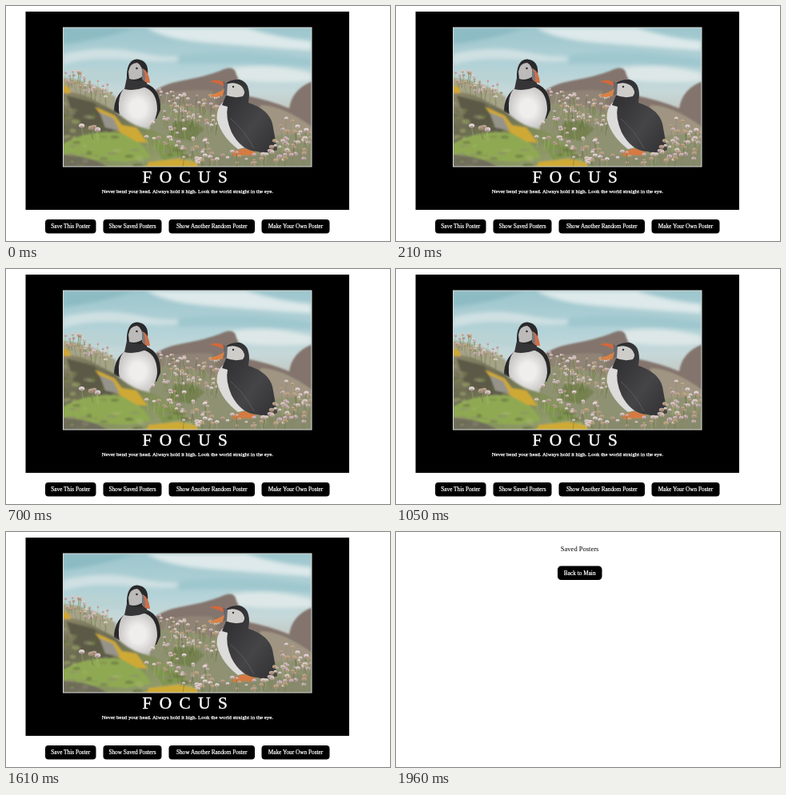
Recreate the animation shown at these times as an HTML page. Size 480 by 294 pixels, loop 3080 ms.

```html
<!DOCTYPE html>
<html lang="en">
<head>
<meta charset="utf-8">
<title>Poster maker</title>
<style>
html, body { margin: 0; width: 100%; height: 100%; overflow: hidden; background: #fff; }
svg { display: block; width: 100vw; height: 100vh; }
text { font-family: "Liberation Serif", "Times New Roman", serif; text-anchor: middle; }
.label { font-size: 7.3px; fill: #fff; stroke: #fff; stroke-width: .22px; }
.caption { font-size: 6.81px; fill: #fff; stroke: #fff; stroke-width: .25px; }
.headline { font-size: 21.3px; letter-spacing: 9.4px; fill: #fff; stroke: #fff; stroke-width: .4px; text-anchor: start; }
.heading { font-size: 8.5px; }
.main { animation: main 3080ms step-end infinite; }
.saved { visibility: hidden; animation: saved 3080ms step-end infinite; }
.pressed { animation: press 3080ms step-end infinite; }
@keyframes main { 0% { visibility: visible } 63.63%, 100% { visibility: hidden } }
@keyframes saved { 0% { visibility: hidden } 63.63%, 100% { visibility: visible } }
@keyframes press {
  0% { fill: #000; stroke: none }
  59.09% { fill: #615b9c; stroke: none }
  61.36% { fill: #615b9c; stroke: #aaa59c }
  63.63%, 100% { fill: #000; stroke: none }
}
</style>
</head>
<body>
<svg viewBox="0 0 480 294" preserveAspectRatio="none">
  <defs>
    <linearGradient id="sea" x2="0" y2="1">
      <stop offset="0" stop-color="#9dc6cd"/>
      <stop offset=".3" stop-color="#b4d3d8"/>
      <stop offset=".45" stop-color="#c6d8d9"/>
      <stop offset=".6" stop-color="#c3c8c2"/>
    </linearGradient>
    <linearGradient id="slope" x2=".8" y2="1">
      <stop offset="0" stop-color="#8b8669"/>
      <stop offset=".35" stop-color="#6b6a52"/>
      <stop offset=".65" stop-color="#83905a"/>
      <stop offset="1" stop-color="#98a075"/>
    </linearGradient>
    <linearGradient id="wing" x2="1" y2="1">
      <stop offset="0" stop-color="#29292c"/>
      <stop offset=".6" stop-color="#454548"/>
      <stop offset="1" stop-color="#303033"/>
    </linearGradient>
    <radialGradient id="belly">
      <stop offset=".4" stop-color="#efeeed"/>
      <stop offset="1" stop-color="#cbc9c8"/>
    </radialGradient>
    <filter id="soft" x="-30%" y="-30%" width="160%" height="160%"><feGaussianBlur stdDeviation="2.5"/></filter>
    <filter id="mild" x="-20%" y="-20%" width="140%" height="140%"><feGaussianBlur stdDeviation="1.1"/></filter>
    <clipPath id="frame"><rect x="71.5" y="27" width="310.5" height="174"/></clipPath>
  </defs>

  <g class="main">
    <rect x="24.5" y="7" width="404.5" height="248"/>
    <g clip-path="url(#frame)">
      <rect x="71" y="27" width="312" height="175" fill="url(#sea)"/>
      <g filter="url(#soft)">
        <path d="M71 27H160Q130 40 71 48Z" fill="#8dbbc3"/>
        <path d="M175 27H300Q340 40 382 44V56Q300 50 250 46T175 27Z" fill="#dde9ea"/>
        <path d="M71 60Q120 48 165 58T250 60Q215 74 160 68T71 74Z" fill="#cfe0e2"/>
        <path d="M215 62Q280 52 382 66V76Q310 70 215 72Z" fill="#9fc7ce"/>
        <path d="M280 78Q330 70 382 84V94Q330 98 285 92Z" fill="#dde7e7"/>
        <path d="M71 82Q110 74 148 84V96Q110 92 71 94Z" fill="#b9d2d3"/>
      </g>
      <g filter="url(#mild)">
        <path d="M180 112Q192 98 222 93Q250 88 268 81Q286 72 288 86L300 112Q330 118 354 128Q358 103 384 94V170H180Z" fill="#83756d"/>
        <path d="M186 112Q220 103 258 106L268 135H185Z" fill="#8f8476"/>
        <path d="M318 124Q345 124 384 152V202H300Z" fill="#a09582"/>
        <path d="M185 124Q220 116 265 136L284 168L382 158V202H170Z" fill="#8f9272"/>
        <path d="M210 145Q230 138 248 154L232 169L202 164Z" fill="#74824f"/>
        <path d="M71 90Q105 92 137 114V136L71 112Z" fill="#a5a38a"/>
      </g>
      <g id="back"></g>

      <g>
        <path d="M151 92Q150 67 164 66.500Q179 68 177 86L175 97Q194 104 193 130L188 141L141 135L135 132Q135 112 150 102Z" fill="#29292b"/>
        <path d="M147 104Q158 99 174 102Q189 108 189 130Q187 153 164 155Q143 153 141 130Q140 112 147 104Z" fill="url(#belly)"/>
        <path d="M151 90Q162 96 175 93L177 100Q162 107 148 104Z" fill="#353537"/>
        <path d="M153 82Q155 71 164 71Q171 74 171 88Q162 94 154 91Z" fill="#bcbbb9"/>
        <path d="M170 78Q178 80 180 96Q174 97 170 91Z" fill="#cf6f4a"/>
        <path d="M170 78Q174 80 174 94L170 91Z" fill="#75767a"/>
        <circle cx="163.500" cy="78" r="1.300" fill="#333"/>
      </g>

      <g>
        <path d="M285 182L282 187L293 190L297 186L307 188L313 183L298 178Z" fill="#d57a42"/>
        <path d="M273 119Q262 127 264 143Q270 164 290 179L303 176L296 126Z" fill="#dddcda"/>
        <path d="M272 99Q280 91 292 92Q304 95 304 112L303 121Q328 129 333 147L339 180Q327 186 314 182Q294 181 282 158Q274 140 277 126L270 124L275 112Z" fill="url(#wing)"/>
        <path d="M281 141Q298 155 310 178" fill="none" stroke="#5a5a5c"/>
        <path d="M273 99Q284 93 294 100Q301 107 296 113Q285 116 274 111Z" fill="#cfcdca"/>
        <path d="M275 97Q265 90 254 94.500Q265 96 273 101Z" fill="#d2683c"/>
        <path d="M273 104L265 108L253 112.500Q266 116 276 110Z" fill="#d98145"/>
        <path d="M271 94.500L277 97L276 111L271 112L273 104Z" fill="#66676b"/>
        <circle cx="284" cy="101" r="1.200" fill="#333"/>
      </g>

      <g filter="url(#mild)">
        <path d="M71 107Q94 107 116 121L137 132Q157 150 174 153Q198 159 219 176L245 202H71Z" fill="url(#slope)"/>
        <path d="M76 112L110 121L139 153L126 160L86 144Z" fill="#5c5a46"/>
        <path d="M72 172Q103 154 145 159Q172 169 181 190L151 195L72 190Z" fill="#8fa953"/>
        <path d="M185 172Q207 168 224 186L196 193Z" fill="#7f9650"/>
        <path d="M71 186Q105 187 128 202H71Z" fill="#706d5c"/>
        <g id="moss"></g>
        <path d="M111 126L136 137L145 149L163 152L177 171L164 170L141 157L127 147Z" fill="#cfa934"/>
        <path d="M117 133L134 140L142 156L124 152Z" fill="#96948a"/>
        <path d="M71 99L79 102L81 109L71 109Z" fill="#d1a735"/>
        <path d="M179 195L217 191L242 197L240 202H174Z" fill="#cfaa35"/>
        <path d="M240 188L303 188L382 177V202H240Z" fill="#878a6c"/>
      </g>
      <g id="front"></g>
    </g>
    <rect x="71.5" y="27" width="310.5" height="174" fill="none" stroke="#d5d8d5"/>
    <text class="headline" x="170.5" y="221">FOCUS</text>
    <text class="caption" x="226.8" y="234.3">Never bend your head. Always hold it high. Look the world straight in the eye.</text>

    <rect x="49" y="267" width="63.5" height="17.5" rx="4"/>
    <rect class="pressed" x="121.5" y="267" width="73" height="17.5" rx="4"/>
    <rect x="203.5" y="267" width="107.5" height="17.5" rx="4"/>
    <rect x="319.5" y="267" width="85" height="17.5" rx="4"/>
    <text class="label" x="80.7" y="278.400">Save This Poster</text>
    <text class="label" x="158" y="278.400">Show Saved Posters</text>
    <text class="label" x="257.2" y="278.400">Show Another Random Poster</text>
    <text class="label" x="362" y="278.400">Make Your Own Poster</text>
  </g>

  <g class="saved">
    <text class="heading" x="229.6" y="24">Saved Posters</text>
    <rect x="202" y="42.5" width="55.5" height="17.5" rx="4.5"/>
    <text class="label" x="229.7" y="54">Back to Main</text>
  </g>
</svg>
<script>
let seed = 17;
const rand = () => (seed = (seed * 16807) % 2147483647) / 2147483647;
const pick = list => list[Math.floor(rand() * list.length)];
const petals = ['#d8c8c3', '#b9a08c', '#e0d5d6', '#c0a684', '#cdb6be'];
const greens = ['#5f6a3c', '#a5b56c', '#7d8a4c', '#8d8871'];

function add(id, tag, attrs) {
  const el = document.createElementNS('http://www.w3.org/2000/svg', tag);
  for (const key in attrs) el.setAttribute(key, attrs[key]);
  document.getElementById(id).append(el);
}

// Scatters thrift flowers in a box whose top edge drops by `drop` from left to right.
function scatter(id, count, x, y, w, h, drop, size) {
  for (let i = 0; i < count; i++) {
    const u = rand(), cx = x + u * w, cy = y + drop * u + rand() * h;
    const r = size * (0.7 + rand() * 0.5);
    add(id, 'path', {
      d: `M${cx} ${cy}q${rand() * 4 - 2} 7 ${rand() * 6 - 3} 15`,
      fill: 'none', stroke: pick(greens), 'stroke-width': 0.7, opacity: 0.7
    });
    add(id, 'ellipse', { cx, cy, rx: r, ry: r * 0.75, fill: pick(petals) });
    add(id, 'ellipse', { cx, cy: cy + r * 0.4, rx: r * 0.7, ry: r * 0.35, fill: '#8f7664', opacity: 0.6 });
  }
}

for (let i = 0; i < 90; i++) {
  const u = rand();
  add('moss', 'ellipse', {
    cx: 72 + u * 160, cy: 120 + u * 55 + rand() * 75,
    rx: 2 + rand() * 5, ry: 1 + rand() * 2, fill: pick(greens), opacity: 0.5
  });
}
scatter('back', 40, 74, 74, 60, 22, 24, 2.3);
scatter('back', 75, 192, 103, 74, 40, 8, 2.3);
scatter('back', 20, 332, 138, 50, 34, 6, 2.6);
scatter('front', 6, 82, 143, 35, 14, 0, 3.2);
scatter('front', 30, 174, 142, 84, 26, 20, 2.6);
scatter('front', 28, 222, 178, 90, 18, 4, 2.6);
scatter('front', 34, 315, 168, 66, 28, -6, 2.9);
</script>
</body>
</html>
```
